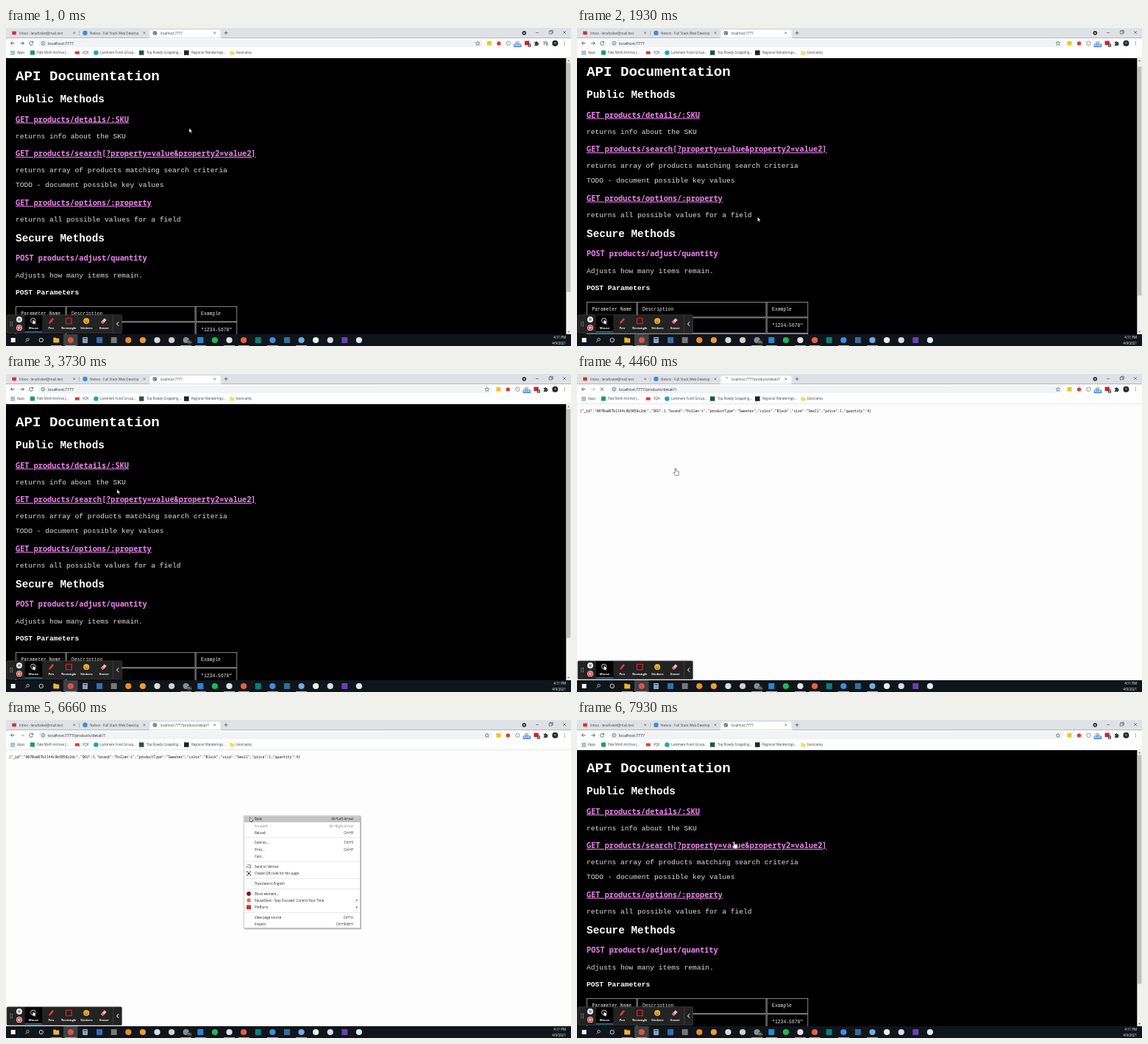
Animation, 768 px wide and 432 px high, one loop 8 s. Source, as an HTML page:

```html
<!DOCTYPE html>
<html lang="en">
<head>
<meta charset="utf-8">
<style>
  html, body { margin: 0; width: 100%; height: 100%; overflow: hidden; background: #000 }
  svg { display: block; width: 768px; height: 432px }
  text { white-space: pre; font-family: "Open Sans", sans-serif }
  .courier { font-family: "Liberation Mono", monospace }
  .code { font-family: "Noto Sans Mono", monospace }
  .bold { font-weight: bold }
  .link { text-decoration: underline }
  .mid { text-anchor: middle }
  .end { text-anchor: end }
</style>
</head>
<body>
<svg id="stage" viewBox="0 0 768 432"></svg>
<script>
const INK = '#3c4043', VIOLET = '#ee82ee';
const LOOP = 8000, SCROLL = 61.3;

const text = (x, y, size, str, fill = INK, cls = '') =>
  `<text x="${x}" y="${y}" font-size="${size}" fill="${fill}" class="${cls}">${str.replace(/&/g, '&amp;')}</text>`;
const box = (x, y, w, h, fill, r = 0, more = '') =>
  `<rect x="${x}" y="${y}" width="${w}" height="${h}" rx="${r}" fill="${fill}" ${more}/>`;
const dot = (x, y, r, fill) => `<circle cx="${x}" cy="${y}" r="${r}" fill="${fill}"/>`;
const ring = (x, y, r, stroke, w = .7) =>
  `<circle cx="${x}" cy="${y}" r="${r}" fill="none" stroke="${stroke}" stroke-width="${w}"/>`;
const line = (d, stroke = INK, w = .7) =>
  `<path d="${d}" fill="none" stroke="${stroke}" stroke-width="${w}"/>`;
const shape = (d, fill) => `<path d="${d}" fill="${fill}"/>`;
const cross = (x, y, r, w = .6) =>
  line(`M${x - r} ${y - r}l${2 * r} ${2 * r}m0 ${-2 * r}l${-2 * r} ${2 * r}`, INK, w);
const group = (id, ...parts) => `<g id="${id}">${parts.join('')}</g>`;

const links = [
  [127.5, 'GET products/details/:SKU'],
  [174, 'GET products/search[?property=value&property2=value2]'],
  [240.7, 'GET products/options/:property'],
];

function docs() {
  const p = (y, s) => text(13, y, 9.6, s, '#ddd', 'courier');
  const h = (y, size, s) => text(13, y, size, s, '#fff', 'courier bold');
  const columns = [[13.5, 67.5], [82.2, 174.8], [258.2, 55.6]];
  const rows = [
    ['Parameter Name', 'Description', 'Example'],
    ['token', 'Your secure token', '"1234-5678"'],
    ['SKU', 'The SKU of the product you want to modify', '"abcd-efgh"'],
    ['quantity', 'The amount to adjust the product count by.', '-2'],
  ];
  const table = rows.flatMap((row, j) => row.map((s, i) => {
    const [x, w] = columns[i], y = 378.3 + 21.55 * j;
    return box(x, y, w, 20.4, 'none', 0, 'stroke="#aaa" stroke-width=".8"') +
      text(x + 6.9, y + 12, 6.4, s, '#eee', 'courier');
  }));
  return group('docs',
    h(70.5, 19.2, 'API Documentation'), h(101, 14.4, 'Public Methods'),
    ...links.map(([y, s]) => text(13, y, 10.28, s, VIOLET, 'code bold link')),
    p(149.5, 'returns info about the SKU'),
    p(196, 'returns array of products matching search criteria'),
    p(216.3, 'TODO - document possible key values'),
    p(262.8, 'returns all possible values for a field'),
    h(290, 14.4, 'Secure Methods'),
    text(13, 316.2, 10.28, 'POST products/adjust/quantity', VIOLET, 'code bold'),
    p(338.5, 'Adjusts how many items remain.'), h(361.8, 9.6, 'POST Parameters'), ...table);
}

const scrollbar = () => group('scrollbar',
  box(761.3, 41, 6.7, 375, '#f1f1f1'), box(762, 47.5, 5.3, 311, '#c1c1c1', 0, 'id="thumb"'),
  shape('M763 45.3l1.7-2 1.7 2z', '#777'), shape('M763 411.7l1.7 2 1.7-2z', '#777'));

const json = () => group('json', box(0, 41, 768, 375, '#fdfdfd'),
  text(3.7, 51.5, 4.755, '{"_id":"6070ad67b1144c9b3058c2dc","SKU":1,"brand":"Pollen\'s","productType":"Sweater",' +
    '"color":"Black","size":"Small","price":1,"quantity":4}', '#111', 'code'));

function browser() {
  const marks = [
    [15, 'Apps'], [42, 'Pale Moth Archive (...'], [104, 'VQK'], [128, 'Larkmere Fund Group...'],
    [191, 'Top Rowdy Grappling...'], [252, 'Regional Wanderings...'], [313, 'bootcamp'],
  ];
  const appGrid = Array.from({ length: 9 }, (_, i) =>
    box(6.5 + i % 3 * 2, 31 + (i / 3 | 0) * 2, 1.4, 1.4, ['#ea4335', '#34a853', '#4285f4'][i / 3 | 0]));
  return [
    box(0, 0, 768, 13.5, '#dee1e6'), box(0, 13.5, 768, 27.5, '#fff'), box(0, 40.3, 768, .7, '#dadce0'),
    shape('M193 13.5q2.5 0 2.5-2.5V5q0-2.5 2.5-2.5h91q2.5 0 2.5 2.5v6q0 2.5 2.5 2.5z', '#fff'),
    box(99.5, 4, .5, 6, '#8a8d91'),
    box(8.3, 4.5, 5.5, 4.5, '#d93025'), text(18, 8.6, 4.5, 'Inbox - lenafosket@mail.test', '#45494d'),
    dot(107.5, 6.8, 3.2, '#3f8ae0'), text(114, 8.6, 4.5, 'Nelvox - Full Stack Web Develop', '#45494d'),
    group('globe', dot(202.3, 6.8, 2.8, '#5f6368'), line('M199.8 6.2l2 1v2M202 4.2l.8 1.6 1.6.6', '#fff', .7)),
    group('spinner', line('M202.5 4.2a2.7 2.7 0 0 1 2.6 2', '#777', .8)),
    '<text id="title" x="210" y="8.6" font-size="4.42" fill="#3c4043"></text>',
    ...[92.7, 188, 283.8].map(x => cross(x, 6.7, 1.4)),
    line('M296.6 6.7h4.8m-2.4-2.4v4.8'),
    dot(704.3, 6.8, 2.8, '#333'), shape('M702.8 6.2h3l-1.5 1.9z', '#fff'),
    line('M720 6.5h4M738.3 4.2h3.8v3.8h-3.8zM739.5 4.2v-1h3.8v3.8h-1.2', INK, .6), cross(759, 6, 1.9),
    box(44, 15.3, 617, 10.8, '#f1f3f4', 5.4, 'id="omnibox"'),
    line('M11.6 20.7h-5m2.2-2.2l-2.2 2.2 2.2 2.2', INK, .8),
    '<g id="forward">' + line('M19.4 20.7h5m-2.2-2.2l2.2 2.2-2.2 2.2', INK, .8) + '</g>',
    group('reload', line('M36.3 19.3a2.5 2.5 0 1 0 .4 2M36.6 17.9v1.9h-1.9', INK, .8)),
    group('stop', cross(34, 20.7, 2, .8)),
    ring(50.4, 20.7, 2.4, INK, .6), box(50.1, 20.2, .6, 2, INK), box(50.1, 19.1, .6, .6, INK),
    '<text id="address" x="57" y="22.6" font-size="5.2" fill="#202124"></text>',
    group('extensions',
      line('M653.8 18l.8 1.8 2 .2-1.5 1.4.4 2-1.7-1-1.7 1 .4-2-1.5-1.4 2-.2z', INK, .55),
      box(666.4, 17.8, 6, 5.8, '#f2c51d'), dot(682.4, 20.9, 2.7, '#e2382e'), ring(695.4, 20.8, 2.6, '#888', .9),
      box(704.8, 17.8, 5.5, 4, '#b8c0ce'), box(702.6, 21.4, 10.4, 4.6, '#2f7de1', .6),
      text(707.8, 25.2, 3.8, 'NEW', '#fff', 'mid bold'),
      box(717.5, 17.5, 6.3, 5.7, '#c6262e'), box(722, 21.2, 4, 4.6, '#444', .6),
      text(724, 25, 3.8, '2', '#fff', 'mid bold'),
      shape('M730.8 19h1.5a1 1 0 1 1 2 0h1.5v1.6a1 1 0 1 1 0 2v1.5h-5v-1.6a1 1 0 1 0 0-2z', INK)),
    group('media', line('M730.5 18.8h4.5M730.5 20.5h4.5M730.5 22.2h2.4M735.7 19v3.8', INK, .7), dot(735, 22.8, .9, INK)),
    dot(746.4, 20.8, 4, '#25272b'), dot(746.4, 20.3, 1.5, '#77706a'),
    ...[18.7, 20.7, 22.7].map(y => dot(759.2, y, .55, INK)),
    ...appGrid, box(33, 30.6, 6, 6, '#1e9e5a', .5), box(93.8, 31.6, 6, 4, '#e03a32'),
    dot(122.4, 33.6, 3.2, '#1aa5b8'), box(181, 30.5, 6.4, 6.2, '#1f5a32'), box(242, 30.4, 6.6, 6.4, '#222'),
    shape('M304.5 31h2.2l.8.9h3v4.5h-6z', '#f7d774'),
    ...marks.map(([x, s]) => text(x, 35.2, 4.4, s)),
  ].join('');
}

function taskbar() {
  const icons = ['#efb52f', '#0', '#0', '#2f6fb3', '#777', '#f08a24', '#f09a35', '#d9dde0', '#d8cfc8', '#8d8d8d',
    '#2489d6', '#1db954', '#e5e0e4', '#e8603c', '#0b7f78', '#3f8fe0', '#2f6f9f', '#6aaee8', '#e6f0ec', '#dcd8f2',
    '#6a3fb5', '#d9ecfa'];
  const square = [3, 4, 10, 14, 16, 20], running = [0, 1, 9, 10, 12, 13, 15, 17];
  const at = i => 68.3 + 19.6 * i;
  return [
    box(0, 416, 768, 16, '#10151b'), box(78, 416, 19.6, 16, '#3c4146'),
    box(6.7, 421, 6, 6, '#f4f4f4'), ring(29.6, 423.2, 1.8, '#ddd'), line('M28.3 424.7l-2 2', '#ddd'),
    ring(47.8, 424, 2.7, '#eee', .9),
    ...icons.map((c, i) => i === 0 ? shape('M64.3 420.5h3l1 1h4v6h-8z', c)
      : i === 1 ? dot(at(1), 424, 4, '#e0523f')
      : i === 2 ? box(104.3, 420, 6.5, 8, '#9cc9ea') + box(105.3, 421, 4.5, 1.6, '#345') + line('M105.5 424.3h4.2m-4.2 2h4.2', '#456', .8)
      : square.includes(i) ? box(at(i) - 4, 420, 8, 8, c) : dot(at(i), 424, 4.1, c)),
    dot(249.3, 427, 3.3, '#333'), text(249.3, 428.4, 3.5, '99+', '#fff', 'mid'),
    ...running.map(i => box(at(i) - 7.5, 431, 15, 1, '#76b9ed')),
    text(761, 422.3, 4.5, '4:11 PM', '#fff', 'end'), text(761, 430.3, 4.5, '4/9/2021', '#fff', 'end'),
  ].join('');
}

function recorder() {
  const labels = ['Mouse', 'Pen', 'Rectangle', 'Stickers', 'Eraser'];
  const grip = Array.from({ length: 6 }, (_, i) => dot(6 + i % 2 * 2.4, 399.6 + (i / 2 | 0) * 2.5, .6, '#ccc'));
  return [
    box(1, 389.7, 156.5, 25, '#232323', 1.5, 'stroke="#555" stroke-width=".5"'), ...grip,
    dot(18, 396, 3.9, '#fff'), box(16.6, 394.3, 1, 3.4, '#333'), box(18.5, 394.3, 1, 3.4, '#333'),
    dot(18, 407.2, 3.9, '#fff'), dot(18, 407.2, 3.2, '#e5322d'), box(16.6, 405.8, 2.8, 2.8, '#fff', .4),
    box(25.7, 390.2, 23.6, 23.2, '#000'), box(25.7, 412.3, 23.6, 1.1, '#1fa9e8'),
    ring(36.8, 397.3, 3.2, '#ddd', .9), shape('M36.5 396.5v6l1.5-1.3 1.2 1.6.9-.7-1.1-1.6 2-.3z', '#fff'),
    shape('M58 402l1-3 4-5 2 1.6-4 5z', '#ef3b3b'),
    line('M81.5 394.3h7.6v7.4h-7.6z', '#e22', 1.1),
    dot(109.2, 398, 4, '#f7b52c'), line('M107 398.8q2.2 2.8 4.4 0', '#5a3200', .8),
    dot(107.8, 397, .6, '#5a3200'), dot(110.6, 397, .6, '#5a3200'),
    shape('M128.8 399.5l5-5.2 2.9 2.4-5 5.2z', '#f3b9bd'), shape('M128.8 399.5l1.8-1.9 2.9 2.4-1.8 1.9z', '#e8646c'),
    ...labels.map((s, i) => text(37.4 + 24 * i, 408.5, 4.1, s, '#fff', 'mid bold')),
    box(145.3, 390, .6, 24.4, '#4a4a4a'), line('M153 399.2l-2.4 2.8 2.4 2.8', '#fff', 1),
  ].join('');
}

function contextMenu() {
  const items = [
    [134.6, 'Back', 'Alt+Left Arrow'], [144, 'Forward', 'Alt+Right Arrow'], [153.2, 'Reload', 'Ctrl+R'],
    [166.7, 'Save as...', 'Ctrl+S'], [176, 'Print...', 'Ctrl+P'], [185.2, 'Cast...'],
    [198.8, 'Send to Velmox'], [208.5, 'Create QR code for this page'], [222.3, 'Translate to English'],
    [236, 'Block element...'], [245.1, 'PauseDesk - Stay Focused  Control Your Time'], [254.3, 'PinBurro'],
    [268, 'View page source', 'Ctrl+U'], [277.2, 'Inspect', 'Ctrl+Shift+I'],
  ];
  return group('menu',
    box(324, 131, 159, 153.4, '#0004', .5), box(323.2, 130, 158.4, 152.8, '#fff', 0, 'stroke="#aaa" stroke-width=".6"'),
    box(323.6, 130.4, 157.6, 8.6, '#c4c4c4'),
    ...[159.6, 191.8, 215.4, 229.2, 261.1].map(y => box(323.6, y, 157.6, .5, '#d5d5d5')),
    ...items.map(([y, name, keys = '']) => {
      const fill = name === 'Forward' ? '#888' : '#222';
      return text(338, y + 1.7, 4.5, name, fill) + text(472, y + 1.7, 4.5, keys, fill, 'end');
    }),
    line('M328 196.8h4.6v3.2h-5.4v-2M331 201h2', '#555', .7),
    line('M327.4 207.3v-1.5h1.5M331.1 205.8h1.5v1.5M332.6 209.7v1.5h-1.5M328.9 211.2h-1.5v-1.5', '#333', .8),
    box(328.8, 207.2, 2.4, 2.6, '#333'),
    dot(330, 236, 2.9, '#8a1420'), dot(330, 245, 2.7, '#f0645f'), box(327, 251.4, 6, 5.8, '#d32d2d'),
    shape('M476.3 243.6l1.6 1.5-1.6 1.5z', '#333'), shape('M476.3 252.8l1.6 1.5-1.6 1.5z', '#333'));
}

const cursor = group('cursor',
  '<g stroke="#111" stroke-width=".5">' +
  '<path id="arrow" fill="#fff" d="M0 0V6.3L1.4 5 2.4 7.2 3.4 6.8 2.4 4.7H4.4Z"/>' +
  '<path id="hand" fill="#fff" d="M-.8.8a.8.8 0 0 1 1.6 0V3.5L3.8 4.2Q4.7 4.5 4.5 5.6L3.8 9.8H-.6L-2.9 6.2Q-2.6 5-1.6 5.7L-.8 6.4Z"/></g>');

const $ = id => document.getElementById(id);
$('stage').innerHTML = box(0, 0, 768, 432, '#000') + docs() + scrollbar() + json() + browser() +
  taskbar() + recorder() + contextMenu() + cursor;

const show = (id, on) => $(id).style.display = on ? '' : 'none';
const ease = (t, a, b) => {
  const k = Math.min(1, Math.max(0, (t - a) / (b - a)));
  return k * k * (3 - 2 * k);
};

// time, x, y of the pointer hotspot
const path = [
  [0, 249, 136], [1200, 88, 117.5], [2400, 326, 328], [3130, 290, 318], [3730, 151, 156.5], [4260, 134, 128],
  [4600, 134, 128], [6100, 323, 130], [6260, 323, 130], [6660, 331.5, 132], [7200, 331.5, 132], [7930, 213.8, 165], [LOOP, 213.8, 165],
];

function pointer(t) {
  const i = path.findIndex(p => p[0] > t);
  const [t0, x0, y0] = path[i - 1], [t1, x1, y1] = path[i];
  const k = ease(t, t0, t1);
  return [x0 + (x1 - x0) * k, y0 + (y1 - y0) * k];
}

function draw(now) {
  const t = now % LOOP;
  const onJson = t >= 4400 && t < 7200, loading = t >= 4400 && t < 4600;
  const scroll = ease(t, 1850, 2270) - ease(t, 3390, 3680);
  const [x, y] = pointer(t);
  const overLink = loading || !onJson && links.some(([base, s]) =>
    Math.abs(y + SCROLL * scroll - base + 3.5) < 6 && x > 13 && x < 13 + s.length * 6.17);

  $('docs').setAttribute('transform', `translate(0 ${-SCROLL * scroll})`);
  $('thumb').setAttribute('y', 47.5 + 51 * scroll);
  show('json', onJson);
  show('scrollbar', !onJson);
  show('menu', t >= 6260 && t < 7200);
  show('globe', !loading);
  show('reload', !loading);
  show('spinner', loading);
  show('stop', loading);
  $('title').textContent = $('address').textContent = 'localhost:7777' + (onJson ? '/products/detail/1' : '');
  $('forward').setAttribute('opacity', onJson ? .4 : 1);

  const media = t < 1800;
  show('media', media);
  $('extensions').setAttribute('transform', `translate(${media ? -12.5 : 0})`);
  $('omnibox').setAttribute('width', media ? 604.5 : 617);

  $('cursor').setAttribute('transform', `translate(${x} ${y})`);
  show('arrow', !overLink);
  show('hand', overLink);
  requestAnimationFrame(() => draw(performance.now()));
}
draw(0);
</script>
</body>
</html>
```
